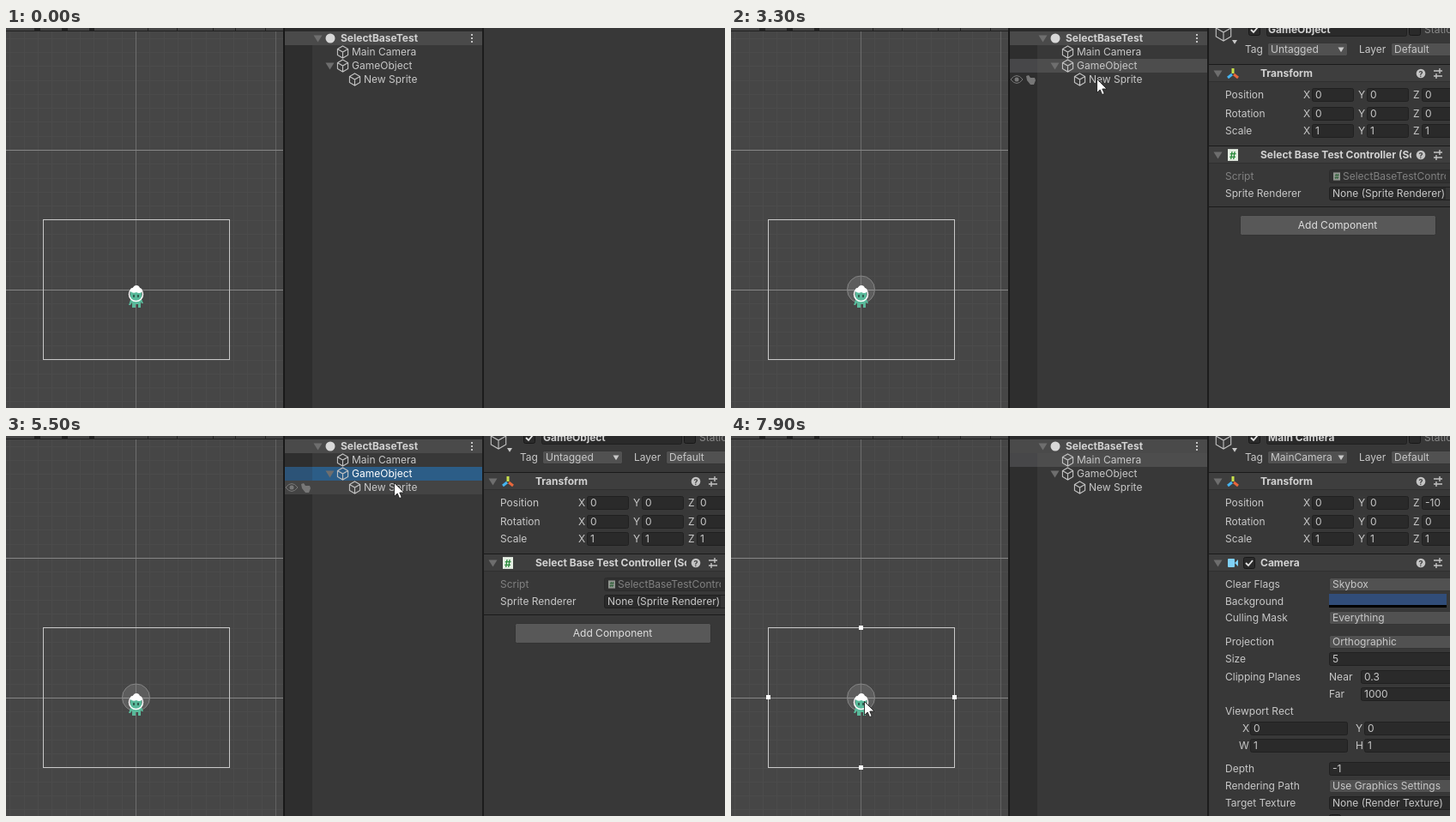
These frames come from a looping animation (838 px wide and 443 px high, 8000 ms). An HTML page:

```html
<!DOCTYPE html>
<html lang="en">
<head>
<meta charset="utf-8">
<style>
  html, body { margin: 0; width: 100%; height: 100%; overflow: hidden; background: #383838; }
  svg { display: block; font: 12px Inter, sans-serif; }
  text { white-space: pre; }
</style>
</head>
<body>
<svg id="stage" width="838" height="443" viewBox="0 0 838 443"></svg>
<script>
const LOOP = 8000, FRAME = 100, TEXT = '#c8c8c8';

// Drawing helpers; text is placed by the vertical centre of its row.
const rect = (x, y, w, h, fill, more = '') =>
  `<rect x="${x}" y="${y}" width="${w}" height="${h}" fill="${fill}" ${more}/>`;
const path = (d, stroke, fill = 'none', more = '') =>
  `<path d="${d}" stroke="${stroke}" fill="${fill}" ${more}/>`;
const text = (x, y, s, fill = TEXT, more = '') =>
  `<text x="${x}" y="${y + 4}" fill="${fill}" ${more}>${s}</text>`;
const bold = (x, y, s, more = '') => text(x, y, s, '#d2d2d2', 'font-weight="700" ' + more);
const group = (id, body) => `<g id="${id}">${body}</g>`;
const box = (x, y, w, h, fill, edge) =>
  rect(x + .5, y + .5, w - 1, h - 1, fill, `stroke="${edge}" rx="2"`);
const arrow = (x, y, w = 5, fill = '#6e6e6e') =>
  path(`M${x - w} ${y - w * .7}h${2 * w}l${-w} ${w * 1.6}z`, 'none', fill);
const cube = (x, y, r = 7) => {
  const w = r * .87, h = r / 2;
  return path(`M${x} ${y - r}l${w} ${h}v${r}l${-w} ${h}l${-w} ${-h}v${-r}z` +
    `m${-w} ${h}l${w} ${h}l${w} ${-h}m${-w} ${h}v${r}`, '#c4c4c4', 'none', 'stroke-width="1.1"');
};
const checkbox = (x, y) => box(x, y, 14, 14, '#2a2a2a', '#181818');
const checked = (x, y) => checkbox(x - 7, y - 7) +
  path(`M${x - 4} ${y}l3 3 5-6`, '#e4e4e4', 'none', 'stroke-width="1.8"');

// Inspector widgets
const field = (x, y, w, s) => box(x, y - 8, w, 16, '#2a2a2a', '#202020') + text(x + 4, y, s);
const menu = (x, y, w, s) => box(x, y - 8, w, 16, '#515151', '#353535') + text(x + 4, y, s) +
  arrow(x + w - 8, y, 3.5, TEXT);
const row = (y, label, widget, value) => text(576, y, label) + (widget ? widget(697, y, 160, value) : '');
const axis = (labelX, x, y, w, name, value) => text(labelX, y, name) + field(x, y, w, value);
const vector = (y, label, values) => text(576, y, label) +
  values.map((v, i) => axis(667 + 64 * i, 677 + 64 * i, y, 49, 'XYZ'[i], v)).join('');
const header = (y, title, icon, more = '') =>
  rect(557, y - 10, 281, 20, '#3e3e3e') + rect(557, y - 11, 281, 1, '#1a1a1a') +
  rect(557, y + 9, 281, 1, '#303030') + arrow(567.5, y) + icon + bold(617, y, title, more) +
  `<circle cx="804" cy="${y}" r="5.3" fill="#c4c4c4"/>` +
  `<text x="804" y="${y + 3.5}" font-size="9" font-weight="700" text-anchor="middle" fill="#3e3e3e">?</text>` +
  path(`M819 ${y - 3}h10m-3-3v6M819 ${y + 3}h10m-7-3v6`, '#c4c4c4', 'none', 'stroke-width="1.4"');
const transformIcon = path('M585 53v-6', '#c8e14c', 'none', 'stroke-width="3"') +
  path('M584 54l-5 4', '#46b4f0', 'none', 'stroke-width="3"') +
  path('M586 54l5 4', '#e8673c', 'none', 'stroke-width="3"');
const scriptIcon = (x, y, s) => rect(x - s, y - s * 1.15, 2 * s, 2.3 * s, '#e6efe4') +
  `<text x="${x}" y="${y + s * .75}" font-size="${s * 2}" font-weight="700" text-anchor="middle" fill="#2a8a3c">#</text>`;
const addButton = y => box(593, y - 12, 229, 24, '#585858', '#333') +
  text(707, y, 'Add Component', '#dedede', 'text-anchor="middle"');
const objectPanel = (name, tag, z) =>
  cube(574, 5, 10) + arrow(587, 16, 3, TEXT) + checked(610, 2) +
  box(624, -8, 164, 18, '#2a2a2a', '#202020') + bold(626, 2, name) +
  checkbox(790, -5) + text(808, 2, 'Static', '#8a8a8a') +
  text(599, 25, 'Tag') + menu(625, 25, 94, tag) + text(732, 25, 'Layer') + menu(769, 25, 100, 'Default') +
  header(53, 'Transform', transformIcon) +
  vector(78, 'Position', [0, 0, z]) + vector(100, 'Rotation', [0, 0, 0]) + vector(120, 'Scale', [1, 1, 1]);

const inspectors = {
  object: objectPanel('GameObject', 'Untagged', 0) +
    header(148, 'Select Base Test Controller (Script)', scriptIcon(585, 148, 6), 'clip-path="url(#title)"') +
    `<g opacity=".5">${row(173, 'Script', field, '')}${scriptIcon(706, 173, 4)}` +
    `${text(713, 173, 'SelectBaseTestController', TEXT, 'clip-path="url(#value)"')}</g>` +
    row(193, 'Sprite Renderer', field, 'None (Sprite Renderer)') + rect(833, 186, 5, 14, '#353535') +
    rect(557, 208, 281, 1, '#1a1a1a') + addButton(230),
  sprite: objectPanel('New Sprite', 'Untagged', 0) +
    header(148, 'Sprite Renderer', rect(580, 143, 10, 10, '#59b58f', 'rx="2"') + checked(604, 148)) +
    row(173, 'Sprite', field, 'character_0') + row(193, 'Color') + rect(697, 185, 136, 14, '#fff') +
    row(213, 'Flip') + checkbox(697, 206) + text(714, 213, 'X') + checkbox(729, 206) + text(746, 213, 'Y') +
    row(233, 'Draw Mode', menu, 'Simple') + row(253, 'Mask Interaction', menu, 'None') +
    row(273, 'Sprite Sort Point', menu, 'Center') + row(293, 'Material', field, 'Sprites-Default') +
    bold(576, 321, 'Additional Settings') + row(341, 'Sorting Layer', menu, 'Default') +
    row(361, 'Order in Layer', field, 0) + rect(557, 380, 281, 1, '#1a1a1a') + addButton(402),
  camera: objectPanel('Main Camera', 'MainCamera', -10) +
    header(148, 'Camera', rect(579, 143, 8, 10, '#7fd0f5', 'rx="1"') +
      path('M587 148l4-4v8z', 'none', '#7fd0f5') + checked(604, 148)) +
    row(173, 'Clear Flags', menu, 'Skybox') + row(193, 'Background') +
    rect(697, 184, 137, 13, '#314d79') + rect(697, 197, 137, 3, '#000') +
    row(212, 'Culling Mask', menu, 'Everything') + row(240, 'Projection', menu, 'Orthographic') +
    row(260, 'Size', field, 5) + row(281, 'Clipping Planes') +
    axis(697, 734, 281, 120, 'Near', 0.3) + axis(697, 734, 301, 120, 'Far', 1000) +
    row(321, 'Viewport Rect') +
    axis(596, 605, 341, 114, 'X', 0) + axis(728, 738, 341, 114, 'Y', 0) +
    axis(592, 605, 361, 114, 'W', 1) + axis(728, 738, 361, 114, 'H', 1) +
    row(388, 'Depth', field, -1) + row(408, 'Rendering Path', menu, 'Use Graphics Settings') +
    row(428, 'Target Texture', field, 'None (Render Texture)') + checkbox(697, 441)
};

// Scene view
let grid = '';
for (let i = -19; i < 11; i++) {
  const x = Math.round(151 + i * 16.3), y = Math.round(305 + i * 16.3);
  grid += rect(x, 4, 1, 439, '#4b4b4b') + rect(0, y, 323, 1, '#4b4b4b');
}
const toolbar = [[0, 33], [40, 25], [72, 25], [103, 62], [166, 33], [200, 41], [242, 25], [268, 34], [303, 20]];
const sceneView = rect(0, 0, 323, 443, '#464646') + grid +
  rect(151, 4, 1, 439, '#6d6d6d') + rect(314, 4, 1, 439, '#626262') +
  rect(0, 142, 323, 1, '#858585') + rect(0, 305, 323, 1, '#858585') +
  rect(0, 0, 323, 4, '#222') + toolbar.map(([x, w]) => rect(x, 0, w, 3, '#454545')).join('') +
  rect(43.5, 223.5, 217, 163, 'none', 'stroke="#c9c9c9"') +
  group('pivot', '<circle cx="151.5" cy="305" r="16" fill="#fff" fill-opacity=".12" stroke="#858585"/>') +
  path('M145 307h13v9l2 5h-2l-1-2v7h-3v-4h-3v4h-4v-6l-2 3h-2l2-6z', 'none', '#59b99a') +
  path('M148 311h2v3h-2zM153 311h2v3h-2z', 'none', '#315e51') +
  '<circle cx="151.5" cy="310.5" r="8" fill="none" stroke="#fff" stroke-width="1.5"/>' +
  path('M145 307q-1-4 3-4q1-3 4-3t4 3q4 1 2 5q-3 2-6 0q-4 2-7-1z', 'none', '#fff') +
  group('handles', [[151, 223], [43, 304], [260, 304], [151, 386]]
    .map(([x, y]) => rect(x - 2, y - 2, 5, 5, '#fff')).join(''));

// Hierarchy
const objects = ['Main Camera', 'GameObject', 'New Sprite'];
const hierarchy = rect(323, 0, 2, 443, '#191919') + rect(325, 0, 230, 443, '#383838') +
  rect(325, 0, 32, 443, '#2e2e2e') + rect(325, 0, 230, 4, '#2b2b2b') +
  rect(325, 4, 230, 16, '#4a4a4a') +
  group('hover', rect(325, 52, 230, 16, '#444')) +
  group('selection', rect(325, 0, 230, 16, 'inherit') + rect(325, 0, 32, 16, '#30303a', 'fill-opacity=".2"')) +
  arrow(363.5, 12) + '<circle cx="378" cy="12" r="5.5" fill="#d8d8d8"/>' + bold(390, 12, 'SelectBaseTest') +
  [8, 12, 16].map(y => rect(542, y - 1, 2, 2, '#c4c4c4')).join('') + arrow(377.5, 44) +
  objects.map((s, i) => cube(i < 2 ? 392.5 : 406.5, 28 + 16 * i) +
    text(i < 2 ? 403 : 417, 28 + 16 * i, s, TEXT, 'class="name"')).join('') +
  group('eyes', path('M326 8q7-9 14 0q-7 9-14 0z', '#777') + '<circle cx="333" cy="8" r="2.5" fill="#777"/>' +
    path('M344 4l3-1 2 3h5l1 3-2 5h-4l-4-5z', 'none', '#777')) +
  rect(555, 0, 2, 443, '#1c1c1c') + rect(557, 0, 281, 443, '#383838');

document.getElementById('stage').innerHTML =
  `<clipPath id="title"><rect x="617" y="138" width="176" height="20"/></clipPath>
  <clipPath id="value"><rect x="697" y="164" width="136" height="18"/></clipPath>` +
  sceneView + hierarchy + Object.entries(inspectors).map(([id, body]) => group(id, body)).join('') +
  group('cursor', path('M.5.5V16.5L4.2 13 6.6 18.6 9.2 17.5 6.8 12H12z', '#222', '#fff', 'stroke-width=".9"'));

// Time, selected row, keyboard focus, inspector
const states = [
  [0, -1], [2500, 1, false, 'object'], [4000, 2, true, 'object'], [4100, 2, true, 'sprite'],
  [4700, 1, true, 'sprite'], [4800, 1, true, 'object'], [6000, -1], [6900, 0, false], [7000, 0, false, 'camera']
];
// Pointer path: time, x, y
const pointer = [
  [300, 704, 75], [1000, 182, 305], [1100, 201, 313], [1300, 151, 321], [1500, 130, 324],
  [2000, 156, 315], [2100, 157, 316], [2700, 157, 316], [3400, 442, 44], [3600, 446, 92],
  [3700, 449, 66], [3800, 450, 57], [4100, 450, 57], [4500, 453, 43], [4900, 453, 43],
  [5000, 456, 42], [5300, 456, 50], [5400, 456, 50], [5500, 452, 54], [5600, 452, 56],
  [5700, 452, 56], [6000, 462, 183], [6100, 462, 183], [6600, 153, 306], [6700, 153, 307],
  [7300, 153, 307], [7400, 153, 308], [7800, 153, 308], [7900, 155, 309]
];
function pointerAt(t) {
  const i = pointer.findIndex(p => p[0] > t);
  if (i < 0) return pointer.at(-1).slice(1);
  const [t0, x0, y0] = pointer[i - 1], [t1, x1, y1] = pointer[i];
  const k = (t - t0) / (t1 - t0), e = k * k * (3 - 2 * k);
  return [Math.round(x0 + (x1 - x0) * e), Math.round(y0 + (y1 - y0) * e)];
}

const el = id => document.getElementById(id);
const show = (id, on) => el(id).style.display = on ? '' : 'none';
const place = (id, x, y) => el(id).setAttribute('transform', `translate(${x} ${y})`);
const labels = [...document.querySelectorAll('.name')];

function draw(now) {
  const t = Math.floor(now % LOOP / FRAME) * FRAME;
  const [, selected, focused, inspector] = states.findLast(s => s[0] <= t);
  for (const id in inspectors) show(id, id === inspector);
  show('pivot', selected >= 0);
  show('handles', selected === 0);
  show('hover', t >= 5500 && t < 5800);
  show('selection', selected >= 0);
  place('selection', 0, 20 + 16 * selected);
  el('selection').setAttribute('fill', focused ? '#2c5d87' : '#4d4d4d');
  labels.forEach((label, i) => label.setAttribute('fill', focused && i === selected ? '#fff' : TEXT));

  const visible = t >= 300;
  const [x, y] = visible ? pointerAt(t) : [0, 0];
  const over = Math.floor((y - 20) / 16);
  const pressed = t >= 4000 && t < 4200 || t >= 4700 && t < 5000;
  show('cursor', visible);
  place('cursor', x, y);
  show('eyes', visible && x > 325 && x < 555 && over >= 0 && over < 3 && !pressed);
  place('eyes', 0, 20 + 16 * over);
}
const begin = performance.now();
function tick() {
  draw(performance.now() - begin);
  requestAnimationFrame(tick);
}
tick();
</script>
</body>
</html>
```
